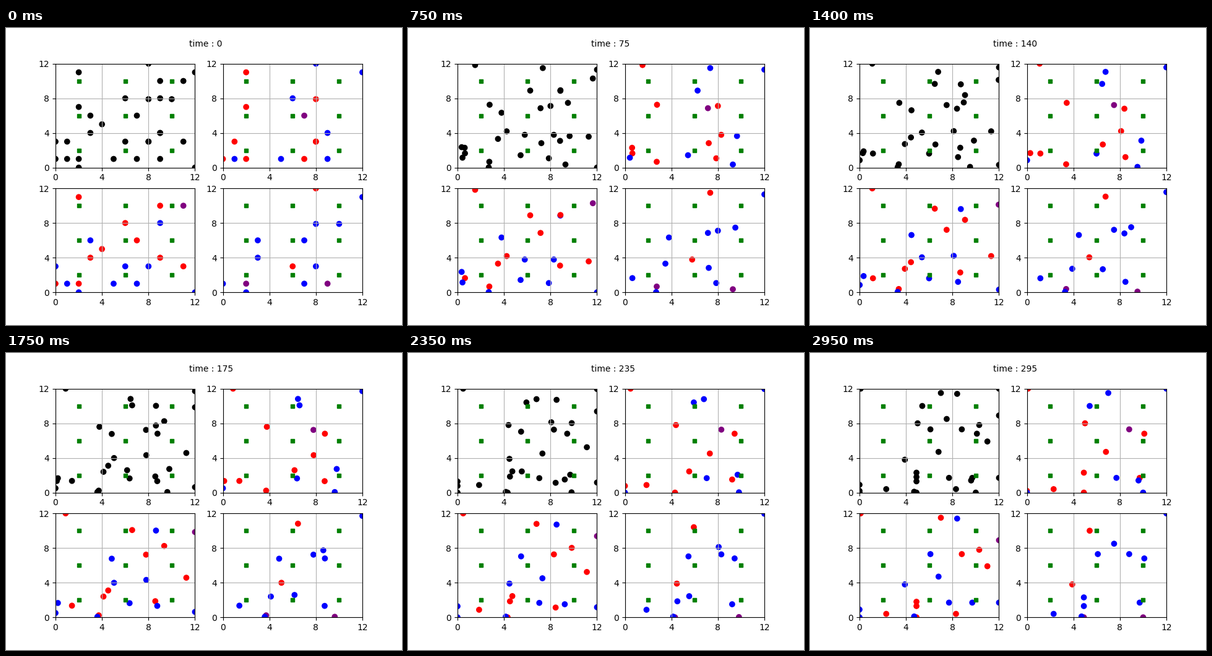
Recreate the animation shown at these times as a matplotlib script. Size 640 px wide and 480 px high, loop 3 s.

```python
import numpy as np
import matplotlib.pyplot as plt
from matplotlib.animation import FuncAnimation

STEP, FRAMES, SIZE = 5, 60, 12
TURN, END = 105, STEP * (FRAMES - 1)
COLORS = {"r": "red", "b": "blue", "p": "purple"}
walkers = []


def walk(groups, start, *way):
    """Steady drift from start, with at most one turn.

    groups holds the colour in panels 2 to 4 ('-' = absent).
    """
    walkers.append((groups, (start, *way)))


def spot(path, t):
    """Place at time t; the walls stop a walker, so it slides along them."""
    times = (0, END) if len(path) == 2 else (0, TURN, END)
    return [np.clip(np.interp(t, times, axis), 0, SIZE) for axis in zip(*path)]


# straight walkers
walk("rr-", (2, 11), (.1, 14.3))
walk("b-r", (8, 12), (5.4, 10))
walk("b-b", (12, 11), (12, 12.2))
walk("r--", (1, 3), (-.5, .2))
walk("r--", (2, 7), (5, 8))
walk("r-b", (8, 3), (4.9, 2.3))
walk("rrp", (2, 1), (4.9, -.3))
walk("br-", (6, 8), (7, 11.5))
walk("-r-", (9, 4), (8.3, .4))
walk("-r-", (4, 5), (4.9, 1.8))
walk("-rb", (3, 4), (4.9, 1.3))
walk("-bb", (3, 6), (6.1, 7.3))
walk("-b-", (9, 8), (8.4, 11.4))
walk("-bb", (2, 0), (4.7, .1))

# walkers that turn
walk("r-b", (8, 7.9), (8, 6.8), (10.1, 6.8))
walk("rb-", (8, 3), (8.4, 4.1), (6.8, 4.7))
walk("rrb", (0, 1), (.9, 1.9), (2.3, .4))
walk("rbb", (7, 1), (8.2, 1.1), (9.7, 1.7))
walk("b--", (9, 4), (9.9, 3.5), (9.6, 1.4))
walk("bb-", (1, 1), (.2, 1.2), (-.8, -.7))
walk("bb-", (5, 1), (5.6, 1.6), (7.7, 1.7))
walk("b-p", (9, 1), (9.4, .1), (10, 0))
walk("prb", (7, 6), (7.2, 7.2), (8.8, 7.3))
walk("-r-", (9, 10), (8.8, 8.5), (10.3, 7.8))
walk("-r-", (11, 3), (11.4, 3.8), (11, 5.9))
walk("-b-", (0, 3), (.5, 2.1), (-.3, .9))
walk("-br", (6, 3), (5.7, 4.1), (3.9, 3.8))
walk("-b-", (12, 0), (12, 0), (12, 1.7))
walk("-p-", (11, 10), (11.9, 10.4), (12.3, 8.9))
walk("--b", (10, 7.9), (9.3, 7.3), (7.5, 8.5))

fig, axes = plt.subplots(2, 2, figsize=(6.4, 4.8), dpi=100)
posts = np.array([(x, y) for x in (2, 6, 10) for y in (2, 6, 10)])
layers = []
for n, ax in enumerate(axes.flat):
    ax.set(xlim=(0, SIZE), ylim=(0, SIZE),
           xticks=range(0, SIZE + 1, 4), yticks=range(0, SIZE + 1, 4))
    ax.grid(True)
    ax.plot(*posts.T, "s", color="green", markersize=4)
    if n == 0:
        members = list(range(len(walkers)))
        colors = ["black"] * len(members)
    else:
        members = [i for i, w in enumerate(walkers) if w[0][n - 1] != "-"]
        colors = [COLORS[walkers[i][0][n - 1]] for i in members]
    dots = ax.scatter([0] * len(members), [0] * len(members), c=colors)
    layers.append((dots, members))
clock = axes[0, 0].text(11.5, 14, "")


def update(frame):
    t = frame * STEP
    spots = np.array([spot(path, t) for _, path in walkers])
    for dots, members in layers:
        dots.set_offsets(spots[members])
    clock.set_text(f"time : {t}")
    return [dots for dots, _ in layers] + [clock]


anim = FuncAnimation(fig, update, frames=FRAMES, interval=50, repeat=True)
plt.show()
```
